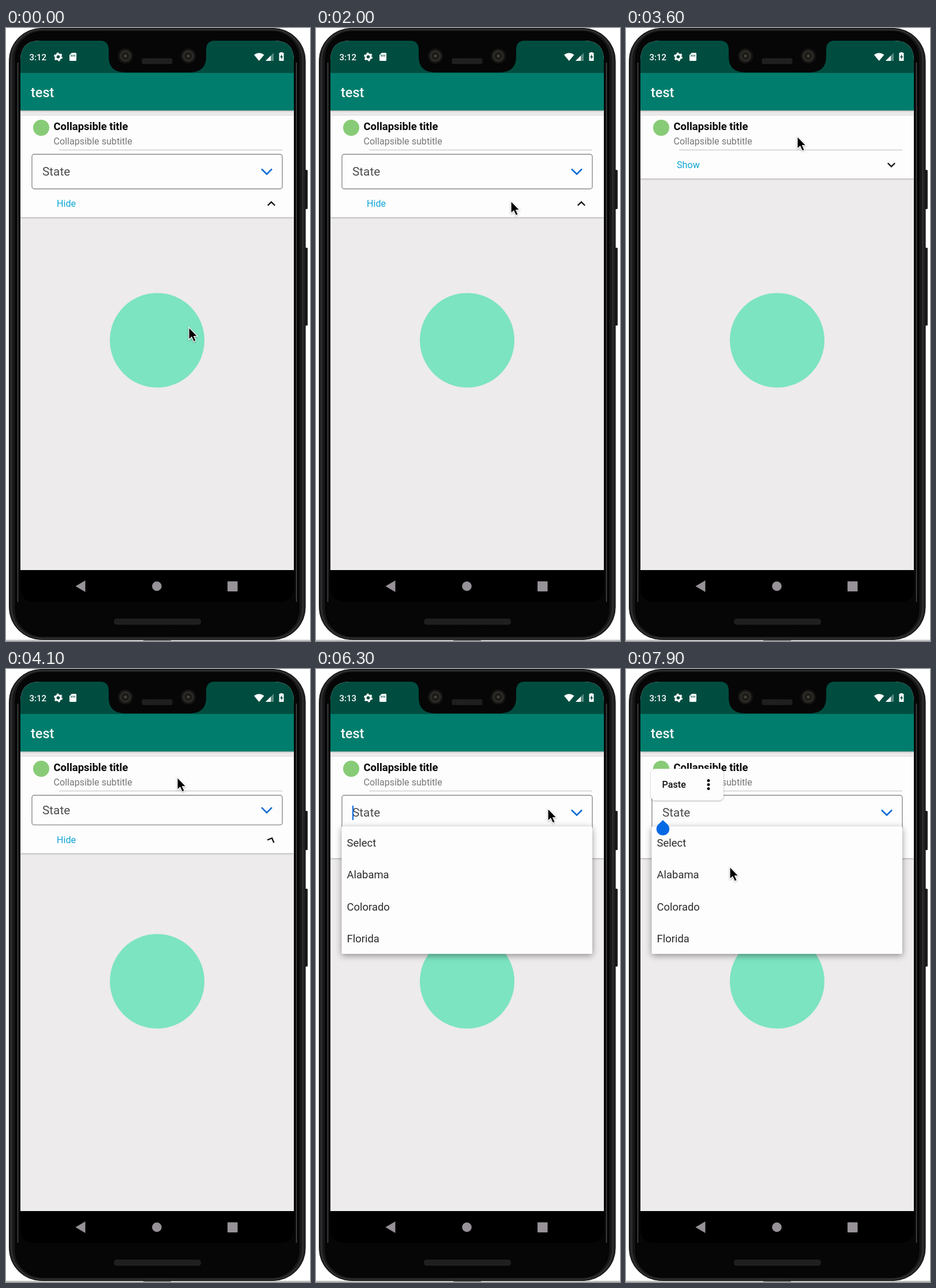
Animation of 527x1063 px, one loop 8000 ms. Source, as an HTML page:

```html
<!DOCTYPE html>
<html lang="en">
<head>
<meta charset="utf-8">
<title>Collapsible card</title>
<style>
  html, body { margin: 0; width: 100%; height: 100%; overflow: hidden; background: #fff; }
  svg { display: block; width: 527px; height: 1063px; font-family: Roboto, sans-serif; }
  .shadow { filter: drop-shadow(0 1px 1.5px rgba(0, 0, 0, .3)); }
  .raised { filter: drop-shadow(0 3px 6px rgba(0, 0, 0, .4)); }
  .medium { font-weight: 500; }
  .line { fill: none; }
</style>
</head>
<body>
<svg viewBox="0 0 527 1063">
  <defs>
    <clipPath id="screen"><path d="M25 56Q25 22 59 22H465Q499 22 499 56V970Q499 995 474 995H50Q25 995 25 970Z"/></clipPath>
    <clipPath id="content"><rect id="contentBox" x="25" y="212" width="474" height="67"/></clipPath>
    <pattern id="mesh" width="3" height="3" patternUnits="userSpaceOnUse">
      <rect width="3" height="3" fill="#1b1b1b"/><rect width="1.3" height="1.3" fill="#303030"/>
    </pattern>
    <g id="lens">
      <circle r="13" fill="#151412"/><circle r="10" fill="#2c2a26"/>
      <circle r="6.5" fill="#1b1a17"/><circle r="2.5" fill="#464239"/>
    </g>
  </defs>

  <!-- phone body -->
  <path d="M0 1061.7H527" stroke="#aaa" stroke-width="1.5"/>
  <path d="M238 1062H286" stroke="#777" stroke-width="2"/>
  <rect x="517" y="246" width="6" height="68" rx="1.5" fill="#202022"/>
  <rect x="517" y="381" width="6" height="135" rx="1.5" fill="#202022"/>
  <rect x="5.5" y=".5" width="513.5" height="1060" rx="56" fill="#232325" stroke="#070707"/>
  <rect x="10" y="3" width="504" height="1055" rx="52" fill="#171718" stroke="#353537" stroke-width="1.5"/>
  <rect x="17" y="7" width="490" height="1047" rx="46" fill="#060607" stroke="#050505" stroke-width="3"/>
  <path class="line" d="M20.5 60V995M503.5 60V995" stroke="#48484a" stroke-width="1.6"/>
  <rect x="187" y="1024" width="151" height="11" rx="5" fill="url(#mesh)"/>

  <g clip-path="url(#screen)">
    <rect x="25" y="22" width="474" height="918" fill="#edebec"/>
    <circle cx="262" cy="541.5" r="82" fill="#7ce4c0"/>

    <!-- card -->
    <rect id="card" class="shadow" x="25" y="152" width="474" height="176" fill="#fefdfe"/>
    <circle cx="61" cy="173" r="14" fill="#88cb77"/>
    <text x="82.5" y="176.5" font-size="18.46" font-weight="700" fill="#050505">Collapsible title</text>
    <text x="82.5" y="202" font-size="16.14" fill="#777">Collapsible subtitle</text>
    <path d="M92 211.5H479" stroke="#cfcdce" stroke-width="1.6"/>
    <g id="field" clip-path="url(#content)">
      <rect id="frame" class="line" x="45" y="219" width="434" height="60" rx="4" stroke="#8d8b8c" stroke-width="1.4"/>
      <g id="fieldBody">
        <text x="63" y="7" font-size="20.76" fill="#4b4b4d">State</text>
        <path class="line" d="M443 -4.5L452 4.5L461 -4.5" stroke="#096bd5" stroke-width="2.6"/>
      </g>
    </g>
    <g id="footer">
      <text id="toggle" x="88" y="5.7" font-size="16.14" fill="#0fa5d3">Hide</text>
      <path id="arrow" class="line" d="M-6.2 3.3L0 -2.9L6.2 3.3" stroke="#111" stroke-width="2.3"/>
    </g>
    <rect id="caret" x="63" y="237" width="2" height="25" fill="#0868dc"/>

    <!-- bars -->
    <rect class="shadow" x="25" y="78" width="474" height="65" fill="#007d6d"/>
    <rect x="25" y="22" width="474" height="56" fill="#004d40"/>
    <text class="medium" x="43" y="119.5" font-size="23.5" fill="#f3faf8">test</text>
    <text id="clock" class="medium" x="40.5" y="56" font-size="15" fill="#fff">3:12</text>
    <g fill="#fff">
      <circle class="line" cx="90.5" cy="50" r="4.4" stroke="#fff" stroke-width="3.2"/>
      <circle class="line" cx="90.5" cy="50" r="6.5" stroke="#fff" stroke-width="2" stroke-dasharray="3.4 3.407"/>
      <path d="M114 43H120.5Q122 43 122 44.5V55.5Q122 57 120.5 57H111.5Q110 57 110 55.5V47Z"/>
      <path d="M112.5 46.5h1.4v3h-1.4zm3 0h1.4v3h-1.4zm3 0h1.4v3h-1.4z" fill="#004d40"/>
      <path d="M430 46.5Q438.700 40 447.500 46.500L438.700 57Z"/>
      <path d="M464 43V57H450Z" opacity=".35"/>
      <path d="M459 48V57H450Z"/>
      <path d="M475.500 43V42H479.500V43H481.500V57H473.500V43Z"/>
      <path d="M478.300 45.500L475 50.800H477.200V54.800L480.200 49.300H478.300Z" fill="#004d40"/>
    </g>
    <path d="M165 22Q178 23 178 38V50Q178 77 207 77H318Q347 77 347 50V38Q347 23 360 22Z" fill="#060607"/>
    <rect x="25" y="940" width="474" height="60"/>
    <g fill="#969298">
      <path d="M120.500 968L137.500 958V978Z"/>
      <circle cx="261.500" cy="968" r="8.300"/>
      <rect x="384" y="959.500" width="17.500" height="17.500" rx="1"/>
    </g>
  </g>
  <use href="#lens" x="207" y="48.500"/>
  <use href="#lens" x="316" y="48.500"/>
  <rect x="235.500" y="52.500" width="53" height="10" rx="3" fill="url(#mesh)"/>

  <!-- overlays -->
  <g id="menu" font-size="18.46" fill="#2b2b2d">
    <rect class="raised" x="44.500" y="273" width="434.500" height="221" rx="1.500" fill="#fefdfe"/>
    <text x="53.500" y="308">Select</text>
    <text x="53.500" y="363.300">Alabama</text>
    <text x="53.500" y="418.600">Colorado</text>
    <text x="53.500" y="473.900">Florida</text>
  </g>
  <g id="paste">
    <rect class="shadow" x="43" y="173" width="126" height="55" rx="8" fill="#fefdfe"/>
    <text class="medium" x="62.500" y="206" font-size="16.140" fill="#111">Paste</text>
    <g fill="#111">
      <circle cx="143" cy="193.500" r="2.500"/><circle cx="143" cy="200.500" r="2.500"/><circle cx="143" cy="207.500" r="2.500"/>
    </g>
    <path d="M64 262L72 269.500A11.200 11.200 0 1 1 56 269.500Z" fill="#0669e4"/>
  </g>
  <path id="cursor" class="shadow" d="M0 0V21.500L4.800 17L8.500 25L12.300 23.300L8.700 15.500H15Z" stroke="#fff" stroke-width="1.200"/>
</svg>
<script>
const LOOP = 8000, STEP = 100;
const COLLAPSE = 2054, EXPAND = 3870, TOGGLE_TIME = 300;
const OPEN_MENU = 5850, OPEN_PASTE = 6950, BLINK = 500;

// time, x, y of the pointer tip
const pointerPath = [
  [900, 317, 519], [1700, 338, 300], [2600, 338, 300], [3400, 297, 188],
  [4500, 297, 188], [5500, 402, 242], [6350, 402, 242], [6850, 218, 247],
  [7000, 218, 247], [7300, 204, 494], [7900, 180, 343]
];

const el = Object.fromEntries([...document.querySelectorAll("[id]")].map(e => [e.id, e]));
const clamp = v => Math.min(1, Math.max(0, v));
const ease = v => (1 - Math.cos(Math.PI * clamp(v))) / 2;
const show = (e, visible) => e.setAttribute("visibility", visible ? "visible" : "hidden");
const move = (e, x, y, angle = 0) => e.setAttribute("transform", `translate(${x} ${y}) rotate(${angle})`);

function pointerAt(t) {
  const next = pointerPath.findIndex(p => p[0] > t);
  if (next === 0) return pointerPath[0].slice(1);
  if (next < 0) return pointerPath.at(-1).slice(1);
  const [t0, x0, y0] = pointerPath[next - 1], [t1, x1, y1] = pointerPath[next];
  const k = ease((t - t0) / (t1 - t0));
  return [x0 + (x1 - x0) * k, y0 + (y1 - y0) * k];
}

function drawCard(t) {
  const open = t < EXPAND
    ? 1 - ease((t - COLLAPSE) / TOGGLE_TIME)
    : ease((t - EXPAND) / TOGGLE_TIME);
  const contentHeight = 67 * open, bottom = 261 + contentHeight;
  const frameHeight = Math.max(0, contentHeight - 7);
  el.card.setAttribute("height", bottom - 152);
  el.contentBox.setAttribute("height", contentHeight + 1);
  el.frame.setAttribute("height", frameHeight);
  show(el.field, frameHeight > 0);
  move(el.fieldBody, 0, 219 + frameHeight / 2);
  move(el.footer, 0, bottom - 23.5);
  move(el.arrow, 460, 0, 180 * (1 - open));
  el.toggle.textContent = t >= COLLAPSE && t < EXPAND ? "Show" : "Hide";
}

function draw(t) {
  drawCard(t);
  el.clock.textContent = t < 5000 ? "3:12" : "3:13";
  const lastTap = t < OPEN_PASTE ? OPEN_MENU : OPEN_PASTE;
  show(el.caret, t >= OPEN_MENU && Math.floor((t - lastTap) / BLINK) % 2 === 0);
  el.menu.setAttribute("opacity", clamp((t - OPEN_MENU) / 200));
  el.paste.setAttribute("opacity", clamp((t - OPEN_PASTE) / 150));
  move(el.cursor, ...pointerAt(t));
}

function tick() {
  const t = performance.now() % LOOP;
  draw(Math.floor(t / STEP) * STEP);
  requestAnimationFrame(tick);
}
tick();
</script>
</body>
</html>
```
